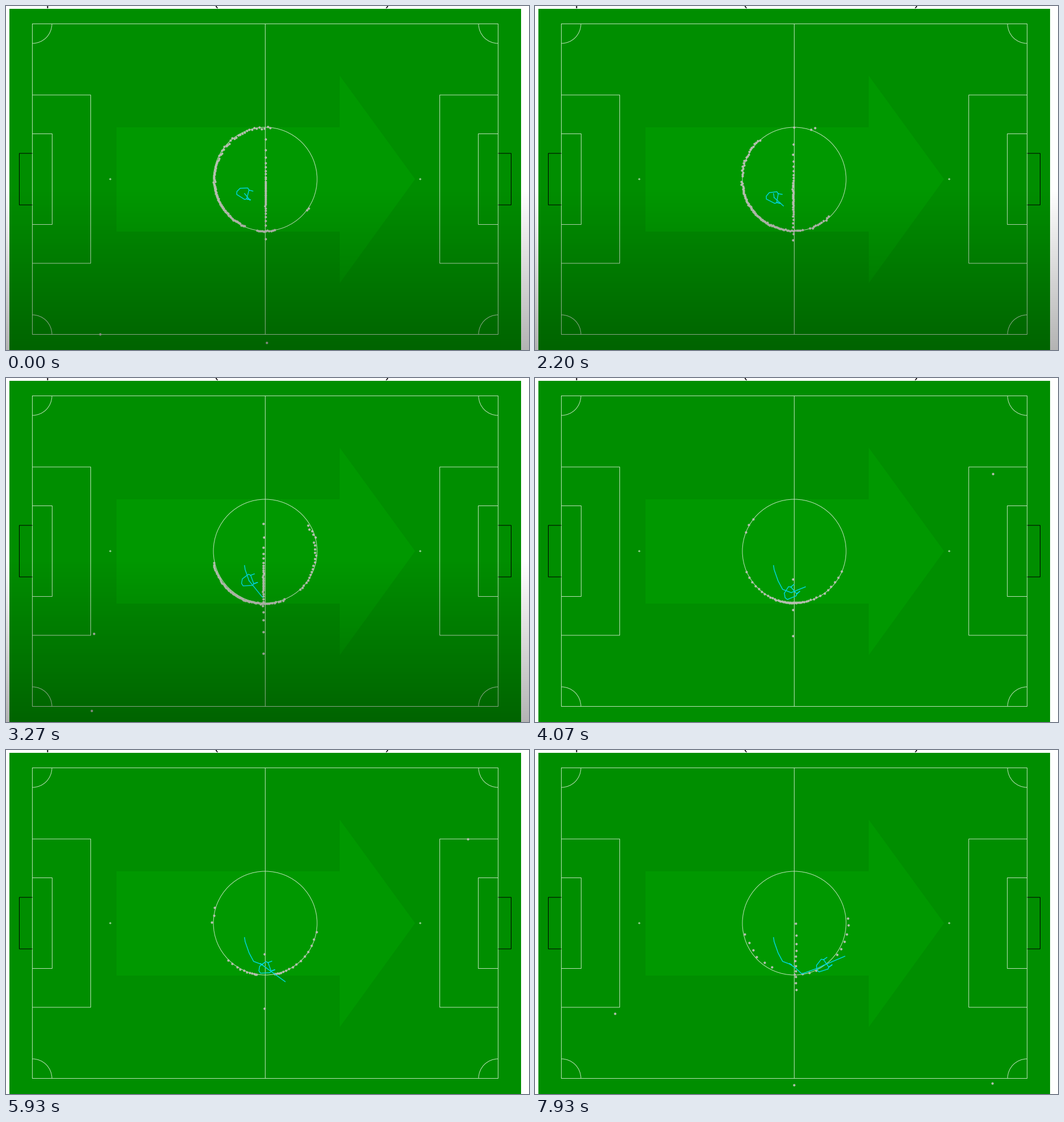
Write a matplotlib script that moves like this. It is 923 by 607 pixels and loops after 8000 ms.

```python
import numpy as np
import matplotlib.pyplot as plt
from matplotlib.animation import FuncAnimation
from matplotlib.patches import Arc, Polygon, Rectangle

W, H, DPI = 923, 607, 64
PX = 72 / DPI                 # points per pixel
LOOP, TICK = 8000, 50
SCANS_PER_MS = 0.015
CX, CY, R = 457.5, 305.5, 91.5
LINE, CYAN = "#bce2b8", "#00d6dc"

plt.rcParams["path.snap"] = False
fig = plt.figure(figsize=(W / DPI, H / DPI), dpi=DPI, facecolor="white")
ax = fig.add_axes([0, 0, 1, 1])
ax.axis("off")


# ---- pitch ----
def stroke(xs, ys, color=LINE):
    ax.plot(xs, ys, color=color, lw=PX, solid_joinstyle="miter",
            solid_capstyle="butt")


def bracket(edge, depth, half, color=LINE):
    """Three-sided box standing on a goal line."""
    far = edge + depth
    stroke([edge, far, far, edge],
           [CY - half, CY - half, CY + half, CY + half], color)


def arc(x, y, r, a0, a1):
    ax.add_patch(Arc((x, y), 2 * r, 2 * r, theta1=a0, theta2=a1,
                     ec=LINE, lw=PX))


def draw_pitch():
    ax.add_patch(Rectangle((6, 5), 903, 610, fc="#008e00"))
    ax.add_patch(Polygon([(195, 214), (589, 214), (589, 123), (722, CY),
                          (589, 489), (589, 398), (195, 398)], fc="#009800"))
    left, top, right, bottom = 46.5, 31.5, 868.5, 579.5
    stroke([left, right, right, left, left], [top, top, bottom, bottom, top])
    stroke([CX, CX], [top, bottom])
    arc(CX, CY, R, 0, 360)
    for edge, s in ((left, 1), (right, -1)):
        bracket(edge, s * 103, 148.5)
        bracket(edge, s * 35, 80)
        bracket(edge, -s * 23, 45.5, "black")
        spot = edge + s * 137.5
        stroke([spot - 2, spot + 2], [CY, CY])
        stroke([spot, spot], [CY - 2, CY + 2])
    for x, y, a in ((left, top, 0), (right, top, 90),
                    (right, bottom, 180), (left, bottom, 270)):
        arc(x, y, 34.5, a, a + 90)


def draw_caption():
    for x, s in ((71, "p"), (367, "("), (670, ")")):
        ax.text(x, -0.5, s, family="Liberation Sans", fontsize=22 * PX,
                color="black", va="baseline")


# ---- robot ----
# time, x, y
TRACK = np.array([
    (0, 421, 331), (2200, 422, 338), (3270, 429, 358), (3700, 437, 373),
    (4070, 453, 379), (5270, 449, 377), (5930, 460, 385), (6800, 471, 395),
    (7600, 499, 385), (7900, 509, 380)])
# time, body angle, gaze angle, gaze length
TURN = np.array([
    (0, 15, 50, 15), (2200, 10, 42, 22), (3250, -20, 51, 38),
    (4050, -40, -22, 27), (5250, -42, -88, 28), (5900, -20, 36, 41),
    (7900, -35, -23, 41)])
BODY = np.array([(13, -8), (6, -8), (3, -11), (-10, -7), (-14, 0), (-13, 5),
                 (3, 10), (6, 8), (13, 8), (6, 8), (6, -8)])


def at(t, table):
    return [np.interp(t, table[:, 0], col) for col in table[:, 1:].T]


# ---- detected line points ----
def seen(dist, rng):
    """Patchy visibility that thins out with distance."""
    n = len(dist)
    patches = rng.random(25)
    patches[-1] = patches[0]
    noise = np.interp(np.arange(n) / n, np.linspace(0, 1, 25), patches)
    return (dist > 18) & (noise > (dist - 40) / 130)


def scan(t):
    """Evenly spaced rays from the robot, cut by the circle and middle line."""
    step = int(t * SCANS_PER_MS + 0.1)
    rng = np.random.default_rng(step + 11)
    pos = np.array(at(t, TRACK))
    n = int(np.interp(t, (3000, 4000), (170, 76)))
    ang = (np.arange(n) + rng.random()) * 2 * np.pi / n
    ray = np.column_stack([np.cos(ang), np.sin(ang)])

    rel = pos - (CX, CY)
    along = ray @ rel
    to_circle = np.sqrt(np.maximum(along**2 - rel @ rel + R**2, 0)) - along
    to_line = (CX - 1 - pos[0]) / ray[:, 0]
    to_line[::2] = -1

    hits = []
    for dist in (to_circle, to_line):
        ok = seen(dist, rng)
        blur = rng.normal(0, 0.012, ok.sum()) + 1
        hits.append(pos + ray[ok] * (dist[ok] * blur)[:, None])
    drift = rng.normal(0, 1.2, 2)

    # false hits around the penalty boxes and the touch line
    k = rng.integers(0, 4)
    stray = np.column_stack([rng.choice([152, 455, 805], k), rng.choice([165, 455, 590], k)])
    return np.vstack(hits + [stray + rng.normal(0, 7, (k, 2))]) + drift


# ---- scene ----
draw_pitch()
draw_caption()
dots, = ax.plot([], [], "o", ms=4.2 * PX, mfc="#b6beb0", mew=0)
trail, body, gaze = (ax.plot([], [], color=CYAN, lw=1.5 * PX)[0]
                     for _ in range(3))

fade = np.zeros((H, 1, 4))
fade[:, 0, 3] = 0.3 * np.clip((np.arange(H) - 320) / 287, 0, 1)
shade = ax.imshow(fade, extent=(0, W, H, 0), aspect="auto", zorder=5)
ax.set_xlim(0, W)
ax.set_ylim(H, 0)


def update(frame):
    t = frame * TICK
    dots.set_data(*scan(t).T)

    x, y = at(t, TRACK)
    past = TRACK[TRACK[:, 0] <= t]
    trail.set_data(np.append(past[:, 1], x), np.append(past[:, 2], y))

    angle, look, reach = at(t, TURN)
    c, s = np.cos(np.radians(angle)), np.sin(np.radians(angle))
    body.set_data(x + BODY[:, 0] * c - BODY[:, 1] * s,
                  y + BODY[:, 0] * s + BODY[:, 1] * c)
    look = np.radians(look)
    gaze.set_data([x, x + reach * np.cos(look)], [y, y + reach * np.sin(look)])

    shade.set_alpha(float(np.clip((3530 - t) / 230, 0, 1)))
    return dots, trail, body, gaze, shade


anim = FuncAnimation(fig, update, frames=LOOP // TICK, interval=TICK,
                     repeat=True, repeat_delay=0, blit=False)
plt.show()
```
